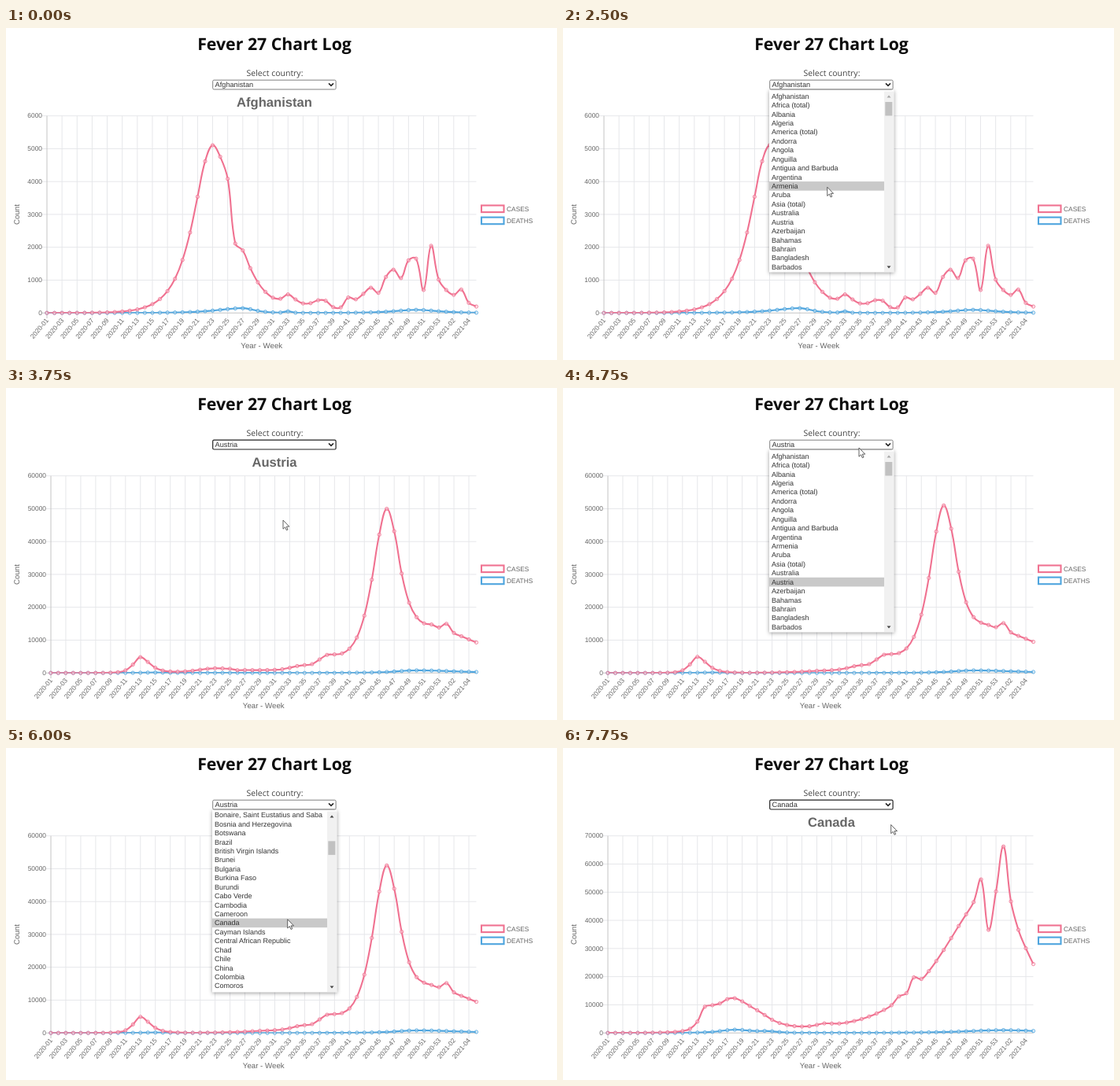
These frames come from a looping animation (700 px wide and 422 px high, 8000 ms). An HTML page:

```html
<!DOCTYPE html>
<html lang="en">
<head>
<meta charset="utf-8">
<title>Fever 27 Chart Log</title>
<style>
  html, body { margin: 0; width: 100%; height: 100%; overflow: hidden; background: #fff; }
  svg { display: block; width: 100vw; height: 100vh; }
  text { font-family: "Liberation Sans", Arial, sans-serif; font-size: 8.4px; fill: #666; text-rendering: geometricPrecision; }
  .head { font: 700 21.3px "Open Sans", "Noto Sans", sans-serif; fill: #0c0c0c; }
  .label { font: 10.5px "Open Sans", "Noto Sans", sans-serif; fill: #444; }
  .title { font-weight: 700; font-size: 16.6px; }
  .axis { font-size: 9.7px; }
  .mid { text-anchor: middle; }
  .end { text-anchor: end; }
  .pick { font-size: 9.2px; fill: #333; }
  .item { font-size: 9px; fill: #333; }
  .grid { stroke: #e6e7ea; fill: none; }
  .zero { stroke: #c4c4c4; fill: none; }
  .cases { stroke: #f07291; }
  .deaths { stroke: #4fa5de; }
  .line { fill: none; stroke-width: 2.1; stroke-linejoin: round; clip-path: url(#area); }
  .dots { fill: rgba(255, 255, 255, .3); stroke-width: .9; }
  .key { fill: #fff; stroke-width: 2.1; }
  .panel { fill: #fff; filter: drop-shadow(0 1px 2.5px rgba(0, 0, 0, .4)); }
</style>
</head>
<body>
<svg viewBox="0 0 700 422" preserveAspectRatio="none">
  <defs>
    <clipPath id="rows"><rect x="262" y="80.5" width="146" height="229.5"/></clipPath>
    <clipPath id="area"><rect x="50" y="110" width="548" height="252.4"/></clipPath>
  </defs>
  <rect width="700" height="422" fill="#fff"/>
  <text class="head mid" x="341" y="28">Fever 27 Chart Log</text>
  <text class="label mid" x="341.5" y="61">Select country:</text>

  <text class="title mid" id="title" x="341" y="100"></text>
  <g id="axes"></g>
  <text class="axis mid" transform="translate(17.3 237) rotate(-90)">Count</text>
  <path class="line deaths" id="deathsLine"/>
  <path class="dots deaths" id="deathsDots"/>
  <path class="line cases" id="casesLine"/>
  <path class="dots cases" id="casesDots"/>

  <rect class="key cases" x="604" y="225.5" width="28.5" height="8.6"/>
  <text x="636" y="232.8">CASES</text>
  <rect class="key deaths" x="604" y="240.6" width="28.5" height="8.6"/>
  <text x="636" y="247.9">DEATHS</text>

  <rect id="box" x="262.7" y="66.2" width="156.4" height="11.8" rx="1.5" fill="#fff"/>
  <text class="pick" id="pick" x="265.6" y="75.2"></text>
  <path d="M410 70.4l3 3 3-3" fill="none" stroke="#222" stroke-width="1.5"/>

  <g id="menu">
    <rect class="panel" x="262" y="79" width="158.5" height="231.5"/>
    <g clip-path="url(#rows)">
      <g id="list">
        <rect id="hover" x="262" width="146" height="11.6" fill="#c9c9c9"/>
      </g>
    </g>
    <rect x="408" y="80.5" width="12" height="229.5" fill="#f1f1f1"/>
    <path id="up" d="M411.5 88.5l2.5-3 2.5 3z"/>
    <path d="M411.5 302.5l2.5 3 2.5-3z" fill="#444"/>
    <rect id="thumb" x="409.3" y="94" width="9" height="17.5" fill="#c1c1c1"/>
  </g>
  <path id="cursor" d="M0 0V11.2L2.6 8.8 4.3 12.7 6 12 4.4 8.1H7.8Z" fill="#fff" stroke="#3a3a3a" stroke-width=".8"/>
</svg>
<script>
const STEP = 250, LOOP = 8000, WEEKS = 58;
const TOP = 111.7, BASE = 362.2, RIGHT = 597.5, ROW = 11.43, LIST_TOP = 80.8;
const $ = id => document.getElementById(id);
const lerp = (a, b, p) => a + (b - a) * p;
const clamp = (v, lo, hi) => Math.min(hi, Math.max(lo, v));

const names = `Afghanistan|Africa (total)|Albania|Algeria|America (total)|Andorra|Angola|Anguilla|Antigua and Barbuda|Argentina|Armenia|Aruba|Asia (total)|Australia|Austria|Azerbaijan|Bahamas|Bahrain|Bangladesh|Barbados|Belarus|Belgium|Belize|Benin|Bermuda|Bhutan|Bolivia|Bonaire, Saint Eustatius and Saba|Bosnia and Herzegovina|Botswana|Brazil|British Virgin Islands|Brunei|Bulgaria|Burkina Faso|Burundi|Cabo Verde|Cambodia|Cameroon|Canada|Cayman Islands|Central African Republic|Chad|Chile|China|Colombia|Comoros|Congo`.split("|");

// Counts are sums of waves: [peak week, height, rise width, fall width].
const charts = [
  {
    name: "Afghanistan", left: 52, max: 6000, tick: 1000,
    cases: [[23, 5100, 2.2, 2.5], [25, 350], [26, -750], [33, 330, .6, 1], [37.5, 260, 1.1],
      [50, 1400, 4, 3], [39.5, -200, .6], [41, 180], [43.7, 220, .5], [45, -210], [46.6, 320, .6],
      [48, -300], [49.6, 420, .6], [51, -820], [52, 985], [56, 340]],
    deaths: [[27, 145, 3, 1.4], [33, 45], [50, 95, 2.5]]
  },
  {
    name: "Austria", left: 57, max: 60000, tick: 10000,
    cases: [[13, 4900, .8, 1.1], [30, 600, 3], [34.5, 1400, 1.4, 1], [38, 4300, 1.2, 2],
      [46, 48000, 1.7, 1.6], [52.5, 12500, 3, 7], [54, 2300]],
    deaths: [[15, 130, 1.5], [50, 780, 2.5, 5]]
  },
  {
    name: "Canada", left: 57, max: 70000, tick: 10000,
    cases: [[14, 6500, .6, 1.4], [17.8, 11300, 1.8, 2.9], [21.5, 900, 1], [30, 1000, 1], [40, 1500],
      [52.5, 50000, 5.8, 4.1], [42, 3800], [51, 7800], [52, -14200], [54, 19500, .35, .48]],
    deaths: [[18, 1150, 1.7, 2], [22.5, 450, 1], [54, 1000, 4.5]]
  }
];

const wave = (week, [peak, height, rise = .35, fall = rise]) =>
  height / Math.cosh((week - peak) / (week < peak ? rise : fall));
const count = (waves, week) => Math.max(0, waves.reduce((sum, w) => sum + wave(week, w), 0));

// Value at k along [position, ...values] keys.
function along(keys, k, i = 1) {
  if (k <= keys[0][0]) return keys[0][i];
  const n = keys.findIndex(key => key[0] >= k);
  if (n < 0) return keys[keys.length - 1][i];
  const a = keys[n - 1], b = keys[n];
  return lerp(a[i], b[i], (k - a[0]) / (b[0] - a[0]));
}

const weekX = (c, i) => c.left + (RIGHT - c.left) * i / (WEEKS - 1);
const valueY = (c, v) => BASE - (BASE - TOP) * v / c.max;

// Each point becomes [x, y, handleInX, handleInY, handleOutX, handleOutY].
function spline(pts) {
  return pts.map((p, i) => {
    const a = pts[i - 1] || p, b = pts[i + 1] || p;
    const d1 = Math.hypot(p[0] - a[0], p[1] - a[1]);
    const d2 = Math.hypot(b[0] - p[0], b[1] - p[1]);
    const f = .4 * d1 / (d1 + d2), g = .4 * d2 / (d1 + d2);
    const dx = b[0] - a[0], dy = b[1] - a[1];
    return [p[0], p[1],
      p[0] - f * dx, clamp(p[1] - f * dy, TOP, BASE),
      p[0] + g * dx, clamp(p[1] + g * dy, TOP, BASE)];
  });
}

for (const c of charts) {
  const place = waves => spline(Array.from({ length: WEEKS }, (_, i) => [weekX(c, i), valueY(c, count(waves, i + 1))]));
  c.curves = { cases: place(c.cases), deaths: place(c.deaths) };
}

function drawAxes(c) {
  let grid = "", labels = "";
  for (let i = 0; i < WEEKS; i += 2) {
    const x = weekX(c, i), week = i < 53 ? i + 1 : i - 52;
    if (i) grid += `M${x} ${TOP}V369`;
    labels += `<text class="end" dy=".35em" transform="translate(${x + .3} 370) rotate(-50)">${i < 53 ? 2020 : 2021}-${String(week).padStart(2, "0")}</text>`;
  }
  for (let v = 0; v <= c.max; v += c.tick) {
    const y = valueY(c, v);
    if (v) grid += `M${c.left - 6} ${y}H${RIGHT}`;
    labels += `<text class="end" x="${c.left - 6}" y="${y + 2.7}">${v}</text>`;
  }
  $("axes").innerHTML = `<path class="grid" d="${grid}"/>
    <path class="zero" d="M${c.left} ${TOP}V369M${c.left - 6} ${BASE}H${RIGHT}"/>${labels}
    <text class="axis mid" x="${(c.left + RIGHT) / 2}" y="406.8">Year - Week</text>`;
  $("title").textContent = c.name;
}

function drawCurve(id, from, to, p) {
  const pts = to.curves[id].map((q, i) => q.map((v, j) => lerp(from.curves[id][i][j], v, p).toFixed(2)));
  $(id + "Line").setAttribute("d", pts.map((q, i) => i
    ? `C${pts[i - 1][4]} ${pts[i - 1][5]} ${q[2]} ${q[3]} ${q[0]} ${q[1]}`
    : `M${q[0]} ${q[1]}`).join(""));
  $(id + "Dots").setAttribute("d", pts.map(q =>
    `M${q[0]} ${q[1]}m-2.1 0a2.1 2.1 0 1 0 4.2 0a2.1 2.1 0 1 0 -4.2 0`).join(""));
}

names.forEach((name, i) => {
  const t = document.createElementNS("http://www.w3.org/2000/svg", "text");
  t.setAttribute("class", "item");
  t.setAttribute("x", 265);
  t.setAttribute("y", LIST_TOP + ROW * i + 8.9);
  t.textContent = name;
  $("list").append(t);
});

// Keys count steps of 250 ms.
const pointer = [[3, 382, 372], [7, 356, 71], [11, 329, 246], [13, 329, 246], [17, 375, 90],
  [19, 376, 76], [22, 360.5, 217], [27, 353.5, 219], [31, 416.7, 97.5]];
const scrolling = [[20, 0], [22, 280], [24, 310]];
const loads = [0, 13, 28];
const picks = [0, 12, 27];
const latest = (starts, k) => starts.filter(s => s <= k).length - 1;

let shownChart = -1, shownStep = -1;

function draw(k) {
  const n = latest(loads, k), chart = charts[n];
  if (n !== shownChart) drawAxes(chart);
  shownChart = n;
  const p = n ? Math.min(1, (k - loads[n]) * .25 + .1) : 1;
  const eased = 1 - (1 - p) ** 4;
  for (const id of ["deaths", "cases"]) drawCurve(id, charts[Math.max(0, n - 1)], chart, eased);

  const x = along(pointer, k, 1), y = along(pointer, k, 2);
  $("cursor").style.display = k < 3 ? "none" : "";
  $("cursor").setAttribute("transform", `translate(${x} ${y})`);

  const open = (k >= 7 && k < 12) || (k >= 18 && k < 27);
  const picked = charts[latest(picks, k)].name;
  const focus = !open && k >= 12;
  $("pick").textContent = picked;
  $("box").setAttribute("stroke", focus ? "#222" : "#808080");
  $("box").setAttribute("stroke-width", focus ? 1.2 : 1);
  $("menu").style.display = open ? "" : "none";
  if (!open) return;

  const offset = along(scrolling, k);
  const lag = k > 20 && k < 24 ? 20 : 0; // the hovered row trails while scrolling
  const row = y < LIST_TOP ? names.indexOf(picked) : Math.floor((y - lag - LIST_TOP + offset) / ROW);
  $("list").setAttribute("transform", `translate(0 ${-offset})`);
  $("hover").setAttribute("y", LIST_TOP + ROW * row);
  $("thumb").setAttribute("y", 94 + offset * 22 / 280);
  $("up").setAttribute("fill", offset ? "#444" : "#a5a5a5");
}

function tick() {
  const k = Math.floor(performance.now() % LOOP / STEP);
  if (k !== shownStep) draw(k);
  shownStep = k;
  requestAnimationFrame(tick);
}
tick();
</script>
</body>
</html>
```
